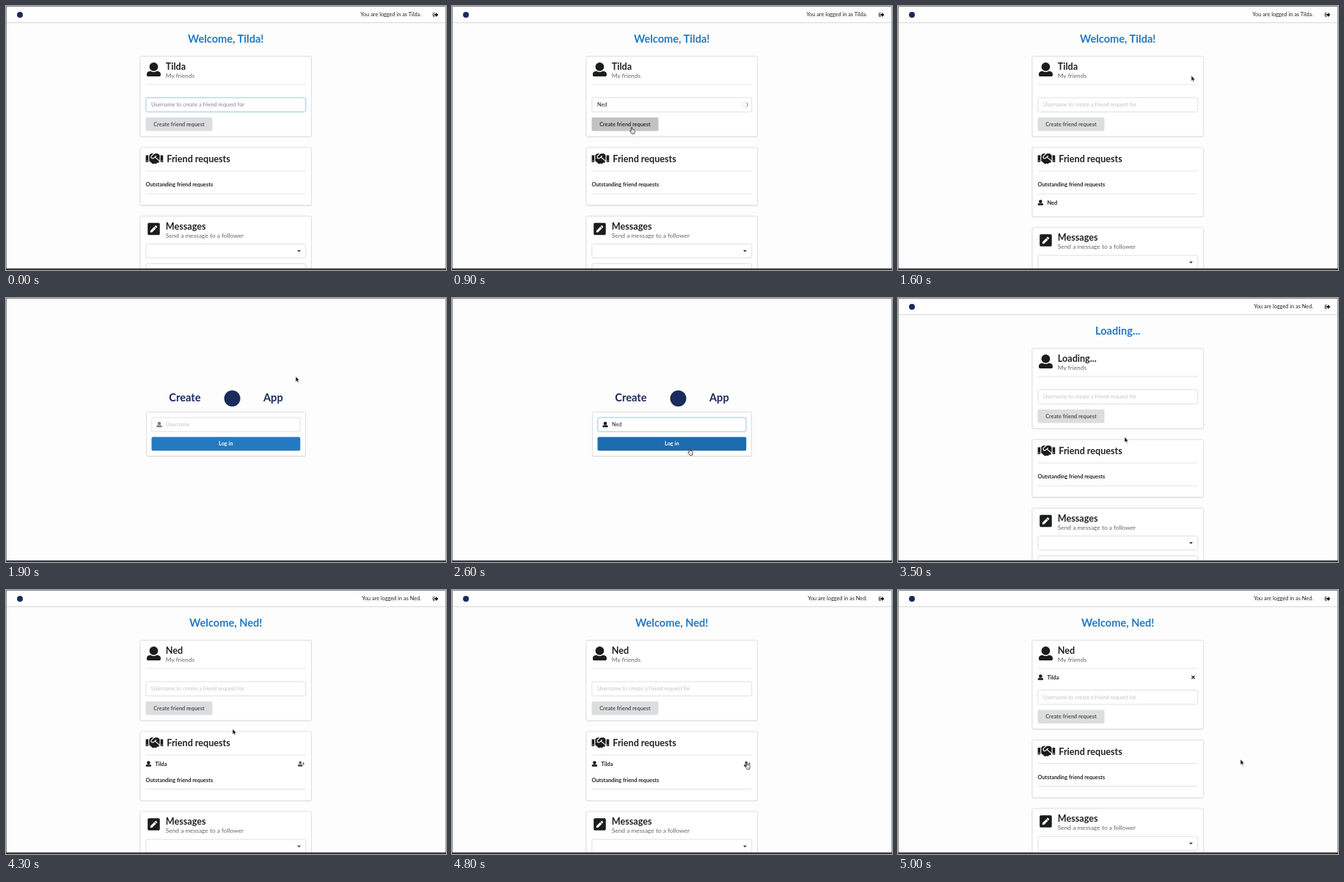
Animation, 600 px wide and 360 px high, one loop 5100 ms. Source, as an HTML page:

```html
<!DOCTYPE html>
<html lang="en">
<head>
<meta charset="utf-8">
<title>Friend request demo</title>
<style>
  html, body { margin: 0; width: 100%; height: 100%; overflow: hidden; background: #fdfdfd; }
  svg { display: block; width: 100%; height: 100%; }
  text { font-family: Lato, sans-serif; font-size: 7.35px; fill: #222; white-space: pre; }
  .bold { font-weight: 700; }
  .h1 { font-weight: 700; font-size: 14.6px; fill: #247ac2; }
  .h2 { font-weight: 700; font-size: 12.6px; }
  .sub { font-size: 8.35px; fill: #666; }
  .navy { fill: #1b2a5c; }
  .white { fill: #fff; }
  .button { font-weight: 700; fill: #555; }
  .hover { fill: #333; }
  .hint { fill: #c3c3c3; }
  .focus { fill: #858585; }
</style>
</head>
<body>
<svg id="stage" viewBox="0 0 600 360"></svg>
<script>
const LOOP = 5100, STEP = 100;
const FIRST = 'Tilda', SECOND = 'Ned';
const INK = '#1b1c1d', BLUE = '#247ac2', NAVY = '#1b2a5c', LINE = '#d6d7d8';
const stage = document.getElementById('stage');

// Icons are drawn on a grid 512 units high.
const person = 'M256 0a160 160 0 1 1 0 320a160 160 0 1 1 0-320z' +
  'M439 334l-71-18c-75 54-166 42-224 0l-71 18C30 345 0 383 0 427v37c0 26 21 48 48 48h416c27 0 48-22 48-48v-37c0-44-30-82-73-93z';
const rightHand = 'M435 64h-86c-8 0-16 3-22 8l-98 90c-17 16-17 41-2 57c12 14 39 18 56 3l80-74' +
  'c7-6 17-6 23 1s6 17-1 23l-26 24L504 314l8 8V128l-55-55c-6-6-14-9-22-9z';
const leftHand = 'M484 339L335 218l-30 27c-30 27-75 25-102-4s-25-75 4-102l82-75h-84c-8 0-16 3-22 9l-55 55v224h18l91 82' +
  'c27 22 68 18 90-10l18 16c16 13 39 10 52-6l32-38 5 4c14 11 34 9 45-5l10-11c11-14 9-34-5-45z';
const cuffs = 'M544 128v224c0 18 14 32 32 32h64V128zM592 352a16 16 0 1 1 0-32a16 16 0 1 1 0 32z' +
  'M0 384h64c18 0 32-14 32-32V128H0zM48 320a16 16 0 1 1 0 32a16 16 0 1 1 0-32z';
const icons = {
  person,
  handshake: rightHand + leftHand + cuffs,
  pencil: 'M400 480H48c-26 0-48-22-48-48V80c0-26 22-48 48-48h352c26 0 48 22 48 48v352c0 26-22 48-48 48z' +
    'M238 178L102 314l-6 57c-1 7 6 14 13 13l57-6L302 242c2-2 2-6 0-8L247 178c-3-2-6-2-9 0z' +
    'M345 165L315 135c-9-9-25-9-34 0l-23 23c-2 2-2 6 0 9l55 55c3 2 6 2 9 0L345 199c9-9 9-25 0-34z',
  exit: 'M497 273L329 441c-15 15-41 4-41-17v-96H152c-13 0-24-11-24-24v-96c0-13 11-24 24-24h136V88c0-21 26-32 41-17l168 168c9 9 9 25 0 34z' +
    'M192 436v-40c0-7-5-12-12-12H96c-18 0-32-14-32-32V160c0-18 14-32 32-32h84c7 0 12-5 12-12V76c0-7-5-12-12-12H96c-53 0-96 43-96 96v192c0 53 43 96 96 96h84c7 0 12-5 12-12z',
  personPlus: 'M224 0a128 128 0 1 1 0 256a128 128 0 1 1 0-256z' +
    'M314 288h-17c-45 21-101 21-146 0h-17C60 288 0 348 0 422v42c0 26 22 48 48 48h352c26 0 48-22 48-48v-42c0-74-60-134-134-134z' +
    'M496 128h64v80h80v64h-80v80h-64v-80h-80v-64h80z',
  cross: 'M80 150l70-70 106 106 106-106 70 70-106 106 106 106-70 70-106-106-106 106-70-70 106-106z'
};

const text = (x, y, str, cls = '', anchor = 'start') =>
  `<text x="${x}" y="${y}" class="${cls}" text-anchor="${anchor}">${str}</text>`;
const rect = (x, y, w, h, fill, stroke = 'none', r = 0) =>
  `<rect x="${x}" y="${y}" width="${w}" height="${h}" rx="${r}" fill="${fill}" stroke="${stroke}" stroke-width=".8"/>`;
const path = (d, attrs) => `<path d="${d}" ${attrs}/>`;
const icon = (name, x, y, size, fill = INK) =>
  path(icons[name], `fill="${fill}" fill-rule="evenodd" transform="translate(${x} ${y}) scale(${size / 512})"`);
const divider = y => rect(190.5, y - .4, 218.5, .8, '#dcdcdd');
const shift = (y, content) => `<g transform="translate(0 ${y})">${content}</g>`;
const dot = (x, y, r) => `<circle cx="${x}" cy="${y}" r="${r}" fill="${NAVY}"/>`;

function card(x, y, w, h) {
  return rect(x, y + .8, w, h, 'none', '#e2e3e4', 2) + rect(x, y, w, h, '#fff', LINE, 2);
}

function personRow(y, name, action) {
  return icon('person', 190.7, y - 3.7, 7.35) + text(203.5, y + 2.6, name, 'bold') + (action || '');
}

function field(s) {
  const border = s.focused ? '#85b7d9' : LINE;
  const content = s.typed
    ? text(198, 137.3, s.typed)
    : text(198, 137.3, 'Username to create a friend request for', s.focused ? 'focus' : 'hint');
  return rect(190.8, 125, 218, 19.4, '#fff', border, 2) + content;
}

function spinner(angle) {
  return '<circle cx="399" cy="134.7" r="4" fill="none" stroke="#e5e5e5"/>' +
    path('M396.17 131.87A4 4 0 0 1 401.83 131.87',
      `fill="none" stroke="#858585" transform="rotate(${angle} 399 134.7)"`);
}

function homePage(s) {
  const friendShift = s.friend ? 11.5 : 0;
  const requestShift = s.request ? 15.5 : 0;
  const sentShift = s.sent ? 15.5 : 0;

  const nav = rect(1, 1, 598, 21.5, '#fff') + rect(1, 22, 598, .8, '#d2d3d4') + rect(1, 22.8, 598, 1, '#f0f0f0') +
    dot(19, 12, 4) + text(566, 14.4, `You are logged in as ${s.user}.`, '', 'end') + icon('exit', 582, 8.2, 7.5);

  const friends = card(183, 68.5, 233.5, 109.5 + friendShift) +
    icon('person', 192, 77, 18.9) + text(217.8, 87, s.name, 'h2') + text(217.8, 98, 'My friends', 'sub') + divider(107) +
    (s.friend ? personRow(119, s.friend, icon('cross', 398.8, 115.3, 7.4, '#333')) : '') +
    shift(friendShift, field(s) + (s.spin === undefined ? '' : spinner(s.spin)) +
      rect(190.5, 152, 91, 18.5, s.hover ? '#c1c2c3' : '#dcddde', 'none', 2) +
      text(236, 163.7, 'Create friend request', s.hover ? 'button hover' : 'button', 'middle'));

  const requests = card(183, 193, 233.5, 78.7 + requestShift + sentShift) +
    icon('handshake', 190.6, 198.8, 18.9) + text(219.3, 213, 'Friend requests', 'h2') + divider(225) +
    (s.request ? personRow(237, s.request, icon('personPlus', 398, 233.4, 7.35, '#555')) : '') +
    shift(requestShift, text(190.5, 246.4, 'Outstanding friend requests', 'bold') + divider(256)) +
    (s.sent ? personRow(268, s.sent) : '');

  const messages = card(183, 286.5, 233.5, 120) +
    icon('pencil', 193.2, 294.6, 18.9) + text(217.8, 304.5, 'Messages', 'h2') +
    text(217.8, 315.6, 'Send a message to a follower', 'sub') +
    rect(190.8, 324.6, 218, 19, '#fff', LINE, 2) + path('M397 333h5l-2.5 2.6z', 'fill="#333"') +
    rect(190.8, 351.5, 218, 19, '#fff', LINE, 2);

  return nav + text(299.7, 49.8, s.title, 'h1', 'middle') + friends +
    shift(friendShift, requests + shift(requestShift + sentShift, messages));
}

function loginPage(s) {
  return text(222.3, 140.5, 'Create', 'h1 navy') + dot(308.5, 137, 11) + text(351, 140.5, 'App', 'h1 navy') +
    card(191.5, 155.5, 217, 60) +
    rect(198.8, 163, 202.2, 19.2, '#fff', s.focused ? '#85b7d9' : LINE, 2) +
    icon('person', 205.3, 168.8, 7.35, s.focused ? INK : '#808080') +
    (s.typed ? text(218, 175.1, s.typed) : text(218, 175.1, 'Username', s.focused ? 'focus' : 'hint')) +
    rect(198.5, 189.5, 202.8, 18.8, s.hover ? '#1e6cb0' : BLUE, 'none', 2) +
    text(299.8, 201.3, 'Log in', 'bold white', 'middle');
}

// Start time, shape and tip position.
const pointerKeys = [
  [0, 'none', 0, 0], [400, 'arrow', 262, 164], [500, 'hand', 245, 165],
  [1600, 'arrow', 400, 95], [1700, 'hand', 585, 11], [1800, 'arrow', 585, 11],
  [1900, 'arrow', 395, 107], [2000, 'arrow', 340, 171], [2200, 'none', 0, 0],
  [2500, 'arrow', 330, 226], [2600, 'hand', 324, 205],
  [3300, 'arrow', 324, 205], [3400, 'arrow', 313, 194], [3500, 'arrow', 309, 189.5],
  [4400, 'arrow', 340, 205], [4500, 'arrow', 372, 221], [4600, 'hand', 402, 235],
  [4900, 'arrow', 402, 235], [5000, 'arrow', 467, 231]
];
const pointerShapes = {
  arrow: path('M0 0V7.4L1.7 5.8 2.9 8.4 4 7.9 2.9 5.4H5.2z', 'fill="#111" stroke="#fff" stroke-width=".5"'),
  hand: path('M-.7 .5Q0-.4 .7 .5V3.3L3.8 4Q4.6 4.3 4.4 5.5L3.7 9.3H.2L-2.3 5.8Q-2.2 4.6-.7 5.7z',
    'fill="#fff" stroke="#222" stroke-width=".8"') +
    path('M1 6v2M2.3 6v2', 'stroke="#555" stroke-width=".4"'),
  none: ''
};
function pointer(t) {
  const [, shape, x, y] = pointerKeys.findLast(key => key[0] <= t);
  return `<g transform="translate(${x} ${y})">${pointerShapes[shape]}</g>`;
}

const typed = (t, start) => SECOND.slice(0, Math.max(0, Math.floor((t - start) / STEP) + 1));

function page(t) {
  if (t < 1800) {
    const done = t >= 1300;
    return homePage({
      user: FIRST, name: FIRST, title: `Welcome, ${FIRST}!`,
      typed: done ? '' : typed(t, 100), focused: t < 600, hover: t >= 500 && t < 1600,
      spin: t >= 600 && !done ? 90 + (t - 900) * .6 : undefined,
      sent: done && SECOND
    });
  }
  if (t < 3300) return loginPage({ typed: typed(t, 2200), focused: t >= 2100, hover: t >= 2600 });
  const loading = t < 4300, accepted = t >= 4900;
  return homePage({
    user: SECOND, name: loading ? 'Loading...' : SECOND,
    title: loading ? 'Loading...' : `Welcome, ${SECOND}!`,
    request: !loading && !accepted && FIRST, friend: accepted && FIRST
  });
}

const windowFrame = rect(0, 0, 600, 1, '#8c8c8c') + rect(0, 0, 1, 360, '#8c8c8c') +
  rect(599, 0, 1, 360, '#a5a5a5') + rect(0, 357.8, 600, 2.2, '#39373a');

let shown = -1;
function draw(now) {
  const t = Math.floor(now % LOOP / STEP) * STEP;
  if (t !== shown) {
    shown = t;
    stage.innerHTML = rect(0, 0, 600, 360, '#fdfdfd') + page(t) + windowFrame + pointer(t);
  }
  requestAnimationFrame(draw);
}
draw(0);
</script>
</body>
</html>
```
